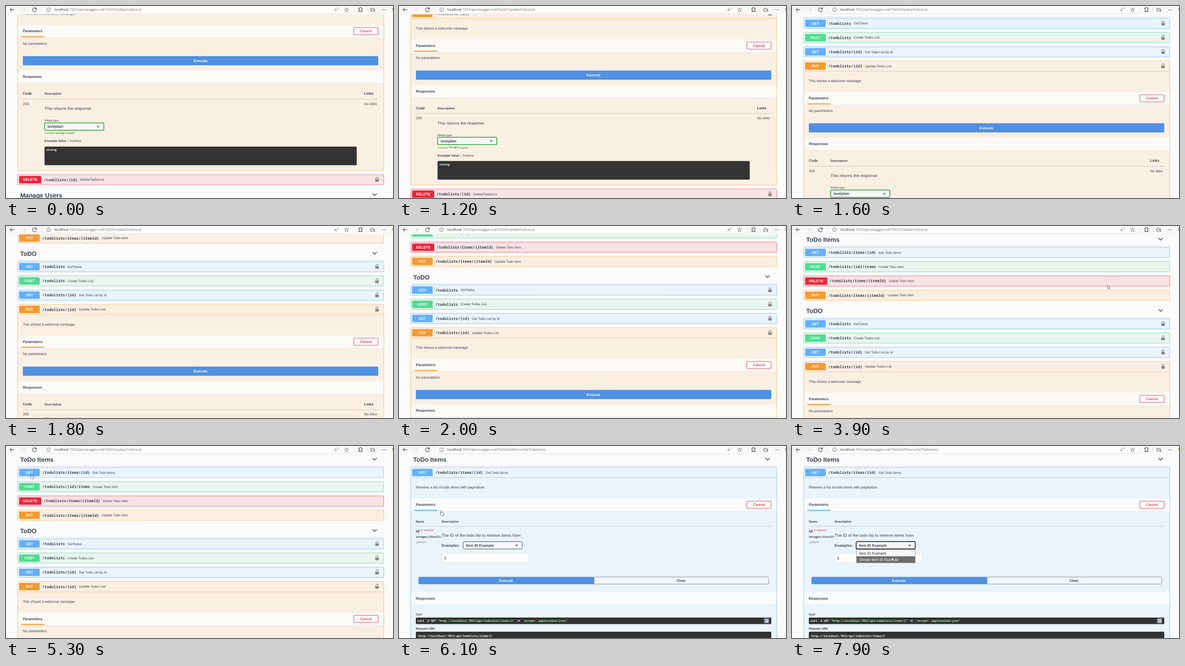
An HTML page for the animation above (8 s loop, 736x366 px).

```html
<!DOCTYPE html>
<html lang="en">
<head>
<meta charset="utf-8">
<title>API docs</title>
<style>
  html, body { margin: 0; width: 736px; height: 366px; overflow: hidden; background: #fbfbfb; }
  svg { display: block; }
  text {
    font-family: "Liberation Sans", Arial, sans-serif;
    text-rendering: geometricPrecision;
    white-space: pre;
    fill: #3b4151;
  }
  .mono { font-family: "Noto Sans Mono", "DejaVu Sans Mono", monospace; }
  .url { font-family: "Open Sans", "Noto Sans", sans-serif; }
</style>
</head>
<body>
<svg id="stage" width="736" height="366" viewBox="0 0 736 366"></svg>
<script>
const LOOP = 8000, STEP = 100;
const INK = '#3b4151', DARK = '#333333';
const SMALL = 5.9, BODY = 6.87, BIG = 7.85, TITLE = 11.8;
const GET = { color: '#61affe', bg: '#eaf4fc', edge: '#a5d2fb' };
const POST = { color: '#50dc91', bg: '#e8f6ef', edge: '#9ee6c1' };
const PUT = { color: '#f69a31', bg: '#faefe3', edge: '#f7cb94' };
const DELETE = { color: '#eb263b', bg: '#f7e3e6', edge: '#f0929c' };

const stage = document.getElementById('stage');

function el(parent, tag, attrs, content) {
  const node = document.createElementNS('http://www.w3.org/2000/svg', tag);
  for (const key in attrs) node.setAttribute(key, attrs[key]);
  if (content !== undefined) node.textContent = content;
  parent.appendChild(node);
  return node;
}
const group = parent => el(parent, 'g', {});
const rect = (p, x, y, x2, y2, fill, more) =>
  el(p, 'rect', { x, y, width: x2 - x, height: y2 - y, fill, ...more });
const line = (p, x, y, x2, y2, stroke, width = 0.6) =>
  el(p, 'line', { x1: x, y1: y, x2, y2, stroke, 'stroke-width': width });
const path = (p, d, more) =>
  el(p, 'path', { d, fill: 'none', stroke: DARK, 'stroke-width': 1, ...more });

// y is the middle of the capitals
const text = (p, x, y, size, str, { color = INK, ...more } = {}) =>
  el(p, 'text', { x, y: y + size * 0.36, 'font-size': size, style: `fill:${color}`, ...more }, str);
const bold = (p, x, y, size, str, more) => text(p, x, y, size, str, { 'font-weight': 700, ...more });
const mid = (p, x, y, size, str, color) => bold(p, x, y, size, str, { color, 'text-anchor': 'middle' });
const mono = (p, x, y, size, str, more) =>
  text(p, x, y, size, str, { class: 'mono', 'font-weight': 700, ...more });

function chevron(p, x, y, r, width) {
  path(p, `M${x - r} ${y - r / 2}L${x} ${y + r / 2}L${x + r} ${y - r / 2}`, { 'stroke-width': width });
}

function heading(p, y, title) {
  bold(p, 27, y, TITLE, title);
  chevron(p, 701, y - 1, 4, 1.2);
  line(p, 22, y + 12.5, 719, y + 12.5, '#dcdde0', 0.8);
}

function lock(p, y) {
  rect(p, 702.3, y - 0.8, 709, y + 4, '#868686', { rx: 0.7 });
  path(p, `M703.7 ${y - 0.6}V${y - 2.4}a2 2 0 0 1 4 0V${y - 0.6}`, { stroke: '#868686', 'stroke-width': 1.1 });
}

function block(p, y, kind, method, route, summary, locked, height = 19.5) {
  const top = y - 9.75, wide = method === 'DELETE';
  rect(p, 22.4, top, 718.4, top + height, kind.bg, { rx: 2, stroke: kind.edge, 'stroke-width': 1.2 });
  rect(p, 25, y - 7, wide ? 67 : 64, y + 7, kind.color, { rx: 1.5 });
  mid(p, wide ? 46 : 44.5, y, BODY, method, '#fff');
  const x = wide ? 71.5 : 69;
  mono(p, x, y, 7.2, route, { 'font-weight': 600 });
  text(p, x + route.length * 4.32 + 4.8, y, 6.38, summary);
  if (locked) lock(p, y);
}

function band(p, y, title) {
  rect(p, 23, y - 12, 718, y + 13, '#000', { opacity: 0.04 });
  rect(p, 23, y - 12, 718, y + 12.2, '#fff', { opacity: 0.8 });
  bold(p, 32, y, BODY, title);
}

function paramBand(p, y, color) {
  band(p, y, 'Parameters');
  rect(p, 29, y + 9.6, 73, y + 11.5, color);
  rect(p, 661.5, y - 6.8, 707.8, y + 6.8, '#fff', { rx: 1.8, stroke: '#e2596b', 'stroke-width': 1.1 });
  mid(p, 684.7, y, BODY, 'Cancel', '#e0445a');
}

function select(p, x, y, x2, label, stroke, width) {
  const box = rect(p, x, y - 7, x2, y + 7, '#f7f7f7', { rx: 1.8, stroke, 'stroke-width': width });
  bold(p, x + 5.4, y, BODY, label);
  chevron(p, x2 - 10.5, y, 2.2, 1.1);
  return box;
}

function openPut(p) {
  block(p, 268, PUT, 'PUT', '/todolists/{id}', 'Update Todos List', true, 337);
  line(p, 22.5, 278, 718.5, 278, PUT.edge, 1);
  text(p, 32, 296.5, BODY, 'This shows a welcome message.');
  paramBand(p, 329.5, PUT.color);
  text(p, 32, 353, BODY, 'No parameters');
  rect(p, 32, 377, 708, 394.5, '#4f91e2', { rx: 1.8 });
  mid(p, 370, 385.7, BODY, 'Execute', '#fff');
  band(p, 416.3, 'Responses');
  bold(p, 32, 448.5, BODY, 'Code');
  bold(p, 73.3, 448.7, SMALL, 'Description');
  bold(p, 681, 448.5, BODY, 'Links');
  line(p, 32, 459, 708, 459, '#c9c3bd', 0.8);
  text(p, 32, 468, BODY, '200');
  text(p, 681, 468, BODY, 'No links', { 'font-style': 'italic' });
  text(p, 73.3, 476.7, BIG, 'This returns the response');
  text(p, 73.3, 500, 5.5, 'Media type');
  select(p, 73.5, 511.2, 186, 'text/plain', '#3aa644', 1.5);
  const green = { color: '#2b9a33' };
  text(p, 73.3, 523.7, 5.4, 'Controls', green);
  mono(p, 95, 523.7, 4.95, 'Accept', green);
  text(p, 114.3, 523.7, 5.4, 'header.', green);
  bold(p, 73.3, 538.7, SMALL, 'Example Value');
  line(p, 117.5, 535.5, 117.5, 542, '#9a9a9a');
  text(p, 120.8, 538.7, SMALL, 'Schema');
  rect(p, 73.3, 549.6, 667, 585, DARK, { rx: 1.8 });
  mono(p, 76.5, 556, 5.4, 'string', { color: '#fff' });
}

function listView(p) {
  block(p, 50.5, GET, 'GET', '/todolists/items/{id}', 'Get Todo Items');
  block(p, 77.7, POST, 'POST', '/todolists/{id}/items', 'Create Todo Item');
  block(p, 104.9, DELETE, 'DELETE', '/todolists/items/{itemId}', 'Delete Todo Item');
  block(p, 132, PUT, 'PUT', '/todolists/items/{itemId}', 'Update Todo Item');
  heading(p, 161.8, 'ToDO');
  block(p, 186.6, GET, 'GET', '/todolists', 'GetTodos', true);
  block(p, 213.7, POST, 'POST', '/todolists', 'Create Todos List', true);
  block(p, 240.8, GET, 'GET', '/todolists/{id}', 'Get Todo List by Id', true);
  openPut(p);
  block(p, 612.5, DELETE, 'DELETE', '/todolists/{id}', 'DeleteTodosList', true);
  heading(p, 641.8, 'Manage Users');
}

function itemView(p) {
  block(p, 50.5, GET, 'GET', '/todolists/items/{id}', 'Get Todo Items', false, 340);
  line(p, 22.5, 60.3, 718.5, 60.3, GET.edge, 1);
  text(p, 32, 79, BODY, 'Retrieve a list of todo items with pagination.');
  paramBand(p, 112, '#61affe');
  bold(p, 32, 144, SMALL, 'Name');
  bold(p, 81, 144, SMALL, 'Description');
  line(p, 32, 153, 708, 153, '#bcc4cc', 0.8);
  bold(p, 32, 162, BIG, 'id');
  bold(p, 41.5, 161.5, 7, '*', { color: '#e8323c' });
  text(p, 47, 160, 5, 'required', { color: '#e8323c' });
  mono(p, 32, 173, 5.4, 'integer($int32)');
  mono(p, 32, 183, 5.4, '(path)', { 'font-weight': 400, 'font-style': 'italic', color: '#6b6f78' });
  text(p, 81, 170, BIG, 'The ID of the todo list to retrieve items from');
  bold(p, 81, 189.2, BODY, 'Examples:');
  rect(p, 81, 204.7, 247, 222.3, '#fff', { rx: 1.8, stroke: '#d8dde2', 'stroke-width': 0.7 });
  bold(p, 86, 213.5, BODY, '1');
  const box = select(p, 122, 189.3, 234.3, 'Item ID Example', '#50555e', 1);
  rect(p, 371, 249.8, 703.2, 263.2, '#f3f8fc', { rx: 1.5, stroke: '#888d94', 'stroke-width': 0.9 });
  rect(p, 37, 249.4, 371, 263.6, '#4f91e2', { rx: 1.5 });
  mid(p, 203.5, 256.5, BODY, 'Execute', '#fff');
  mid(p, 536.5, 256.5, BODY, 'Clear', INK);
  band(p, 290.6, 'Responses');
  bold(p, 32, 321, SMALL, 'Curl');
  rect(p, 32, 327, 708, 339.6, DARK, { rx: 1.8 });
  [[0, 'curl -X GET ', '#fff'],
   [12, '"http://localhost:7033/api/todolists/items/2"', '#a2fca2'],
   [57, ' -H  ', '#fff'],
   [62, '"accept: application/json"', '#a2fca2']
  ].forEach(([col, str, color]) => mono(p, 35 + col * 3.24, 333.3, 5.4, str, { color }));
  rect(p, 694, 328, 704, 338, '#7d8293', { rx: 1.5 });
  rect(p, 696.8, 330.3, 701.2, 336, 'none', { stroke: '#fff', 'stroke-width': 0.7 });
  rect(p, 698, 332.5, 702, 335, '#e7e8ee');
  bold(p, 32, 348.3, SMALL, 'Request URL');
  rect(p, 32, 354, 708, 376, DARK, { rx: 1.8 });
  mono(p, 37, 362, 5.4, 'http://localhost:7033/api/todolists/items/2', { color: '#fff' });
  return box;
}

function dropdown(p) {
  rect(p, 122.7, 197.6, 234.3, 222.8, '#f6f6f6', { stroke: '#8c8c8c', 'stroke-width': 0.7 });
  return ['Item ID Example', 'Simple Item ID Example'].map((label, i) => {
    const y = 204 + i * 12.4;
    return {
      back: rect(p, 123, y - 6.1, 234, y + 6.2, '#6c6c6c'),
      label: text(p, 127.6, y, 7, label)
    };
  });
}

function toolbar(p) {
  rect(p, 0, 0, 736, 16, '#f8f8f9');
  rect(p, 68.5, -4, 662, 14.2, '#fff', { rx: 9, stroke: '#dcdcde', 'stroke-width': 0.8 });
  path(p, 'M15.5 7H7.5M11 3.5L7.5 7L11 10.5');
  path(p, 'M29 7H37M33.5 3.5L37 7L33.5 10.5', { stroke: '#d4d4d4' });
  path(p, 'M57.5 5.5A3.8 3.8 0 1 0 57.9 7.8M58 2.8V5.7H55');
  el(p, 'circle', { cx: 81, cy: 7, r: 3.7, fill: 'none', stroke: '#666', 'stroke-width': 0.8 });
  path(p, 'M81 6.5V9M81 4.8V5.6', { stroke: '#666', 'stroke-width': 0.8 });
  text(p, 624.5, 7.2, 7.5, 'A', { color: '#666' });
  path(p, 'M630.3 3.2q1 1 0 2.4M631.8 2.5q1.6 1.8 0 3.9', { stroke: '#666', 'stroke-width': 0.6 });
  const star = (x, stroke) => {
    let d = '';
    for (let i = 0; i < 10; i++) {
      const r = i % 2 ? 2 : 4.2, a = i * Math.PI / 5;
      d += `${i ? 'L' : 'M'}${x + r * Math.sin(a)} ${7.2 - r * Math.cos(a)}`;
    }
    path(p, d + 'Z', { stroke, 'stroke-width': 0.8, 'stroke-linejoin': 'round' });
  };
  star(647.7, '#666');
  path(p, 'M671 4H673a1.4 1.4 0 0 1 2.8 0H677.3V6a1.4 1.4 0 0 0 0 2.8V10.6H671V8.8a1.4 1.4 0 0 0 0-2.8Z');
  line(p, 686.3, 3, 686.3, 11, '#d0d0d0');
  star(696.5, '#444');
  rect(p, 698, 5.5, 703, 12, '#f8f8f9');
  path(p, 'M698 6.3H702M698.5 8.3H702M699 10.3H702', { 'stroke-width': 0.8 });
  for (const x of [716.2, 719, 721.8]) el(p, 'circle', { cx: x, cy: 7.2, r: 0.75, fill: DARK });
  rect(p, 734.8, 4, 736, 9, '#a8a04a');
  const address = el(p, 'text', { x: 92, y: 9.2, 'font-size': 6.45, class: 'url' });
  el(address, 'tspan', { style: 'fill:#222' }, 'localhost');
  return el(address, 'tspan', { style: 'fill:#6a6a6a' }, '');
}

// Page layers
rect(stage, 0, 0, 736, 366, '#fbfbfb');
const page = group(stage);
heading(page, 26, 'ToDo Items');
const list = group(page);
listView(list);
const item = group(page);
const selectBox = itemView(item);
const menu = group(item);
const options = dropdown(menu);
const route = toolbar(group(stage));
const pointer = group(stage);
const arrow = path(pointer, 'M0 0V7.2L1.7 5.7L2.8 8.2L3.9 7.7L2.8 5.3H5Z',
  { fill: '#fff', stroke: '#444', 'stroke-width': 0.65 });
const hand = path(pointer, 'M2.6 6V1.2Q3.4 .2 4.1 1.2V4.2L7.2 4.8Q8.4 5.1 8.2 6.4L7.3 9.6H3.6L1 6.6Q.8 5.2 2.6 6Z',
  { fill: '#fff', stroke: '#444', 'stroke-width': 0.7 });

// Motion: [time, value...]
const SCROLL = [[1100, 281.5], [1200, 254], [1600, 153.5], [2000, 64.5], [2300, 28], [2600, 8], [2900, 0]];
const POINTER = [
  [3900, 600, 112], [4300, 380, 95], [4600, 140, 68], [4700, 95, 78], [5100, 46, 55], [5200, 46, 55],
  [5300, 45, 53], [5800, 45, 53], [5900, 46, 58], [6100, 77, 123], [6400, 400, 200], [6600, 602, 219],
  [6700, 602, 212], [7000, 480, 198], [7400, 215, 180], [7600, 187, 176], [7700, 188, 188], [7900, 189.3, 212]
];

function at(keys, t) {
  if (t <= keys[0][0]) return keys[0].slice(1);
  for (let i = 1; i < keys.length; i++) {
    const a = keys[i - 1], b = keys[i];
    if (t <= b[0]) {
      const k = (t - a[0]) / (b[0] - a[0]);
      return a.slice(1).map((v, j) => v + (b[j + 1] - v) * k);
    }
  }
  return keys[keys.length - 1].slice(1);
}

const show = (node, on) => node.setAttribute('visibility', on ? 'visible' : 'hidden');

function draw(t) {
  const opened = t >= 5500, menuOpen = t >= 7700;
  page.setAttribute('transform', `translate(0 ${-at(SCROLL, t)[0]})`);
  list.style.display = opened ? 'none' : '';
  item.style.display = opened ? '' : 'none';
  menu.style.display = menuOpen ? '' : 'none';
  route.textContent = ':7033/api/swagger/ui#/' + (opened ? 'ToDo%20Items/GetTodoItems' : 'ToDO/UpdateTodosList');
  selectBox.setAttribute('stroke', menuOpen ? '#222' : '#50555e');
  selectBox.setAttribute('stroke-width', menuOpen ? 1.5 : 1);

  const chosen = t >= 7900 ? 1 : 0;
  options.forEach(({ back, label }, i) => {
    back.style.display = i === chosen ? '' : 'none';
    label.style.fill = i === chosen ? '#fff' : DARK;
  });

  const [x, y] = at(POINTER, t);
  const pointing = t >= 4200 && t < 6200;
  pointer.setAttribute('transform', `translate(${x} ${y})`);
  show(arrow, t >= 3900 && !pointing);
  show(hand, pointing);
}

const start = performance.now();
function tick() {
  const t = (performance.now() - start) % LOOP;
  draw(Math.floor(t / STEP) * STEP);
  requestAnimationFrame(tick);
}
tick();
</script>
</body>
</html>
```
